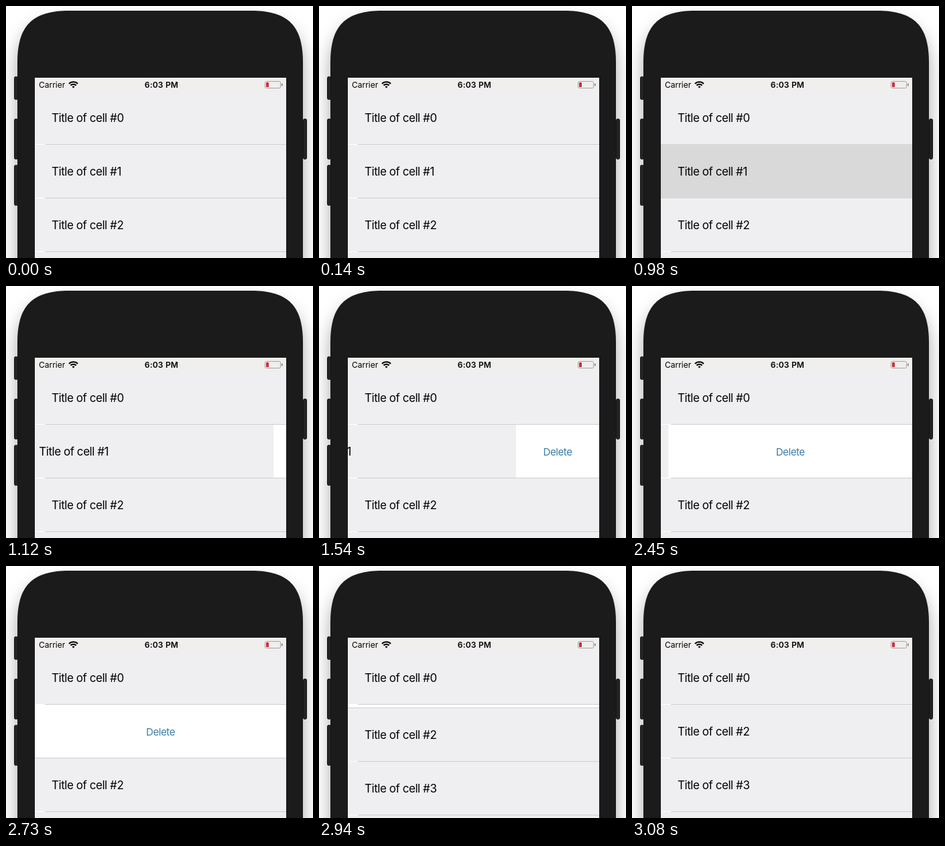
Recreate the animation shown at these times as an HTML page. Size 458 by 376 pixels, loop 4690 ms.

```html
<!DOCTYPE html>
<html lang="en">
<head>
<meta charset="utf-8">
<title>Swipe to delete</title>
<style>
  html, body { margin: 0; width: 100%; height: 100%; overflow: hidden; background: #fff; }
  svg { display: block; width: 458px; height: 376px; }
  text { font: 17px Inter, sans-serif; letter-spacing: -.45px; }
  .status { font-size: 12px; letter-spacing: 0; }
  .time { font-weight: 600; letter-spacing: .2px; text-anchor: middle; }
  .delete { font-size: 15px; letter-spacing: -.4px; text-anchor: middle; fill: #3a7ca8; }
  .body { fill: #1b1b1b; filter: drop-shadow(0 16px 13px rgba(0, 0, 0, .34)); }
  .button { fill: #242424; stroke: #141414; }
  .cell { fill: #efeff1; }
  .line { fill: #cfcfd2; }
  .gap { fill: #fff; }
</style>
</head>
<body>
<svg viewBox="0 0 458 376">
  <clipPath id="screen"><rect x="43" y="107" width="375" height="269"/></clipPath>

  <path class="body" d="M17 460V85C17 30 38 7 95 7H365C422 7 443 30 443 85V460Z"/>
  <g class="button">
    <rect x="12.5" y="105.5" width="5" height="34" rx="2"/>
    <rect x="12.5" y="168.5" width="5" height="60" rx="2"/>
    <rect x="12.5" y="237.5" width="5" height="60" rx="2"/>
    <rect x="443.5" y="168.5" width="5" height="60" rx="2"/>
  </g>

  <g clip-path="url(#screen)">
    <rect class="cell" x="43" y="127" width="375" height="249"/>
    <g id="action">
      <rect id="panel" y="207" height="80" fill="#fff"/>
      <text id="delete" class="delete" y="252.5">Delete</text>
    </g>
    <g id="rows"></g>
    <rect id="press" x="43" y="206" width="375" height="81" fill="#d9d9d9"/>
    <text id="swiped" y="253">Title of cell #1</text>

    <rect x="43" y="107" width="375" height="20" fill="#f0efed"/>
    <text class="status" x="49" y="122">Carrier</text>
    <text class="status time" x="232" y="122">6:03 PM</text>
    <g fill="none" stroke="#000" stroke-width="2.1">
      <path d="M94 116.1a9 9 0 0 1 13 0M96.4 118.6a5.7 5.7 0 0 1 8.2 0"/>
      <path d="M100.5 122.6l-2-2.1a2.9 2.9 0 0 1 4 0z" fill="#000" stroke="none"/>
    </g>
    <rect x="386.5" y="112.5" width="23" height="10" rx="2" fill="none" stroke="#a3a3a3"/>
    <rect x="388" y="114" width="4" height="7" rx=".5" fill="#c8303f"/>
    <rect x="411" y="115.5" width="1.5" height="4" rx=".7" fill="#777"/>
  </g>
</svg>
<script>
const LOOP = 4690, STEP = 70;
const TOP = 127, ROW = 80, LEFT = 43, RIGHT = 418, WIDTH = RIGHT - LEFT, BUTTON = 124;

const $ = id => document.getElementById(id);
const set = (el, attrs) => { for (const k in attrs) el.setAttribute(k, attrs[k]); };
const progress = (t, from, to) => Math.min(1, Math.max(0, (t - from) / (to - from)));
const easeOut = (p, n) => 1 - (1 - p) ** n;
const easeInOut = (p, n) => p < .5 ? (2 * p) ** n / 2 : 1 - (2 - 2 * p) ** n / 2;

// Each row carries the separator that lies on its upper edge.
$('rows').innerHTML = [0, 2, 3, 4].map(n => `<g id="row${n}">
  <rect class="cell" x="${LEFT}" width="${WIDTH}" height="${ROW}"/>
  <rect class="gap" x="${LEFT}" y="-1" width="15" height="1"/>
  <rect class="line" x="58" y="-1" width="360" height="1"/>
  <text x="68" y="46">Title of cell #${n}</text></g>`).join('') +
  `<g id="edge"><rect class="gap" x="${LEFT}" y="206" width="15" height="1"/>
  <rect class="line" x="58" y="206" width="360" height="1"/></g>`;

function draw(t) {
  const pressed = t >= 980 && t < 1120;
  const open = t < 1120 ? 0 : BUTTON * easeOut(progress(t, 1084, 1540), 2);
  const reveal = open + (WIDTH - BUTTON) * easeInOut(progress(t, 1830, 2684), 4);
  const collapse = ROW * easeOut(progress(t, 2730, 3080), 3);

  set($('press'), { visibility: pressed ? 'visible' : 'hidden' });
  set($('swiped'), { x: 68 - reveal });
  set($('panel'), { x: RIGHT - reveal, width: reveal });
  set($('delete'), { x: RIGHT - reveal + Math.max(reveal, BUTTON) / 2 });
  for (const n of [0, 2, 3, 4]) {
    const y = TOP + ROW * n - (n ? collapse : 0);
    set($('row' + n), { transform: `translate(0 ${y})` });
  }
  const full = reveal >= WIDTH && collapse < ROW;
  set($('row2').querySelectorAll('rect')[1], { class: full ? 'line' : 'gap' });
}

function tick() {
  const t = performance.now() % LOOP;
  draw(Math.floor(t / STEP) * STEP);
  requestAnimationFrame(tick);
}
tick();
</script>
</body>
</html>
```
